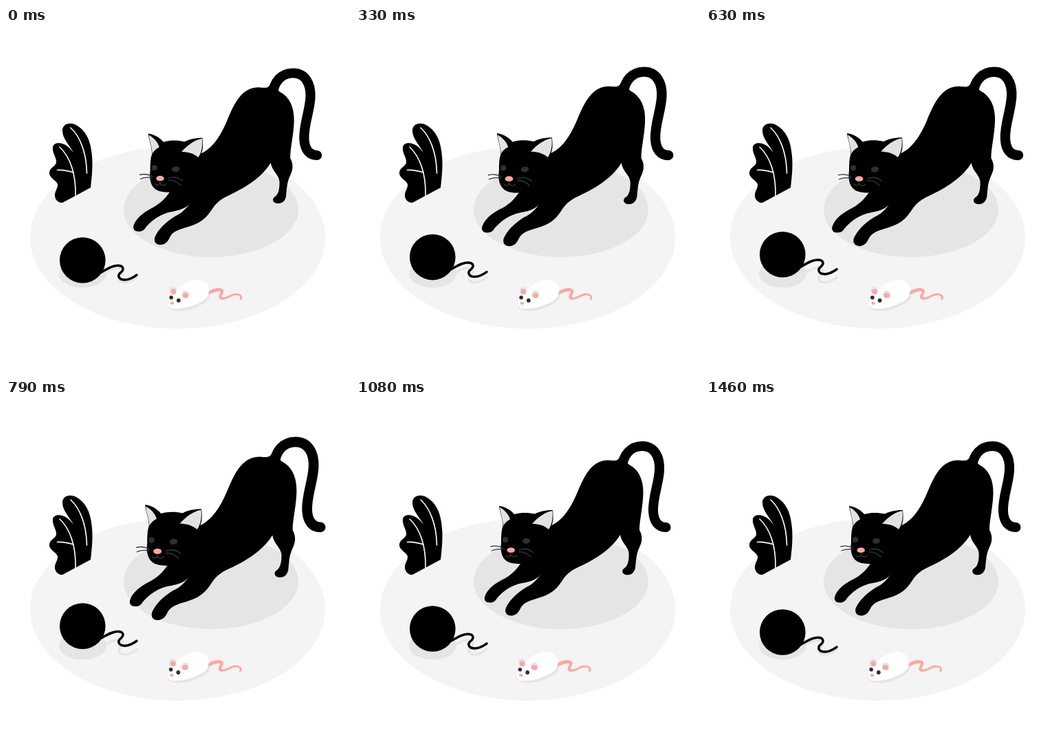
These frames come from a looping animation (500 px wide and 500 px high, 1.5 s). An HTML page:

```html
<!DOCTYPE html>
<html lang="en">
<head>
<meta charset="utf-8">
<title>Playful cat</title>
<style>
  html, body { margin: 0; height: 100%; overflow: hidden; background: #fff; }
  svg { display: block; width: 100vw; height: 100vh; }
  .line { fill: none; stroke-linecap: round; stroke-linejoin: round; }
  .pink { fill: #ffa6a3; }
  .dark { fill: #263238; }
  .shade { fill: #e5e5e5; }
</style>
</head>
<body>
<svg viewBox="0 0 500 500">
  <defs>
    <path id="thread" d="M138 355.500C148 350 154 345.800 162 345.600C171 345.500 172 351 167 355.500C161 360 164 366.500 173 366.300C181 366 186 362 190 359.300"/>
  </defs>

  <ellipse cx="249.5" cy="304.5" rx="214.5" ry="132.5" fill="#f4f4f4"/>
  <ellipse class="shade" cx="298" cy="264" rx="127" ry="69"/>

  <g id="plant">
    <path d="M82 254C75 254 71 249 71 243C71 237 76 232 75 227C73 221 63 218 63 211C63 203 71 202 73 196C74 189 67 182 68 173C69 167 77 166 83 168.500C90 171 94 176 98 181C93 171 82 161 82 149C82 140 92 136 102 141C115 148 122 162 124 178C127 197 125 214 123 232Z"/>
    <g class="line" stroke="#fff" stroke-width="1.6">
      <path d="M94 145C107 157 117 180 117.500 211"/>
      <path d="M78 173C93 187 102 212 101 245"/>
      <path d="M74.500 206.500C82 206 90 207.500 98 210"/>
    </g>
  </g>

  <g id="cat">
    <path class="line" stroke="#000" stroke-width="14" d="M387 98C388 80 399 67 416 67C434 67 442 83 441 102C440 122 431 142 432 162C433 178 440 185 450.500 185"/>
    <path d="M276 185C298 180 311 159 321 136C332 110 342 87.500 367 87.500C378 88.500 380 89 384 82L397 94C411 101 418 116 417.500 136C417 156 412 174 412 189C417 198 416 206 412 214C407 224 407 235 406 244C404 253 398 255 392 254C386 252.500 386 247 390 244.500C396 241 397 230 396.500 222C395 212 386 208 384 196C372 216 349 231 325 242C309 249 304 256 298 265C290 277 281 283 266 287.500C250 292 244 295 240 301C236 309 234 312 227 313.500C219 314 216 309 217.500 303C222 292 233 281 246.500 272.700C257 268 262 262 269 253C261 264 246 265 235.500 267.500C221 272 211 281 205 288C201 295 196 295 190.500 294C187 292 186 289 187.500 285C191 275 201 267.500 211 262C224 256 232 248 239 238Z"/>
    <path d="M208 154C217 155 225 160 230 166C240 163 251 163.500 260 165.500C268 161.500 277 160 286 160C287 170 287 177 284 183C300 200 285 235 255 235C247 238.500 236 239 226 237C213 234 209 222 211 207C211 198 211 190 213.500 183C213 172 209 163 208 154Z"/>
    <g fill="#e2e2e2">
      <path d="M209 156C216 160 222 166 224 173.500C219 176 216 179 214 183C213.500 173 210 165 209 156Z"/>
      <path d="M285.500 161C286.500 171 285 181 280 188C273 182 265 180 256 180C264 171 274 163 285.500 161Z"/>
    </g>
    <ellipse class="dark" cx="217" cy="203" rx="4.200" ry="4"/>
    <ellipse class="dark" cx="247.500" cy="205" rx="5.500" ry="4" transform="rotate(-8 247.500 205)"/>
    <ellipse class="pink" cx="225.200" cy="218.300" rx="5.700" ry="3.800"/>
    <g class="line" stroke="#303b43" stroke-width="1.300">
      <path d="M225 222V225C223 229 220 228 218 226M225 225C227 229 231 229 234 226"/>
      <path d="M214 215.500C208 212 202 211.500 196 213M213 217.500C207 216 202 217 197 219"/>
      <path d="M237 218C245 215 252 217 257 221.500M237 221C243 220 249 223 254 228"/>
    </g>
  </g>

  <ellipse class="shade" cx="111.500" cy="357" rx="34.500" ry="20.500"/>
  <use href="#thread" y="3.500" class="line" stroke="#e5e5e5" stroke-width="3.500"/>
  <g id="ball">
    <circle cx="111.300" cy="337.800" r="33.300"/>
    <use href="#thread" class="line" stroke="#000" stroke-width="3.500"/>
  </g>

  <g id="mouse">
    <path class="shade" d="M235 405C240 413 260 413 274 407C286 402 297 396 297 388L290 382L240 398Z"/>
    <g class="line" stroke="#ffa6a3">
      <path stroke-width="4.800" d="M295 385C303 380 312 379 314 382"/>
      <path stroke-width="4" d="M314 382C316 386 307 391 314 393"/>
      <path stroke-width="2.700" d="M314 393C323 394 327 386 336 387C342 388 343 391 341 394"/>
    </g>
    <path fill="#fff" d="M236 402C236 392 243 384 254 376C264 366 281 363 290 370C297 376 297 387 290 394C280 402 262 408 247 408C239 408 236 406 236 402Z"/>
    <ellipse class="shade" cx="243" cy="381.500" rx="5.300" ry="5.500"/>
    <ellipse class="pink" cx="243.500" cy="383.300" rx="3.800" ry="4"/>
    <ellipse class="shade" cx="261" cy="387" rx="5.500" ry="5.500"/>
    <ellipse class="pink" cx="261" cy="388.700" rx="4.300" ry="3.800"/>
    <circle class="dark" cx="240.300" cy="391.700" r="2.800"/>
    <circle class="dark" cx="251" cy="396" r="2.900"/>
    <ellipse class="pink" cx="241.500" cy="400" rx="2.800" ry="2"/>
  </g>
</svg>
<script>
  const LOOP = 1500, STEPS = 36;
  const start = performance.now();
  const [cat, ball, mouse] = ["cat", "ball", "mouse"].map(id => document.getElementById(id));

  // Linear interpolation through [position, value] keys.
  function track(keys, p) {
    const i = keys.findIndex(([at]) => at >= p);
    const [a, from] = keys[i - 1], [b, to] = keys[i];
    return from + (to - from) * (p - a) / (b - a);
  }

  const beat = [[0, 1], [.1, 1.088], [.3, 1], [.4, 1], [.5, 1.088], [.6, 1], [1, 1]];
  const bob = [[0, 0], [.5, -10], [1, 0]];
  const shake = [0, -1, 2, -4, 4, -4, 4, -4, 2, -1, 0].map((x, i) => [i / 10, x]);

  function draw() {
    // The motion runs at 24 steps per second, sampled mid-step.
    const step = Math.floor((performance.now() - start + 4) % LOOP / LOOP * STEPS);
    const p = (step + .5) / STEPS;
    cat.setAttribute("transform", `translate(322.5 187) scale(${track(beat, p)}) translate(-322.5 -187)`);
    ball.setAttribute("transform", `translate(0 ${track(bob, p)})`);
    mouse.setAttribute("transform", `translate(${track(shake, p)} 0)`);
    requestAnimationFrame(draw);
  }
  draw();
</script>
</body>
</html>
```
